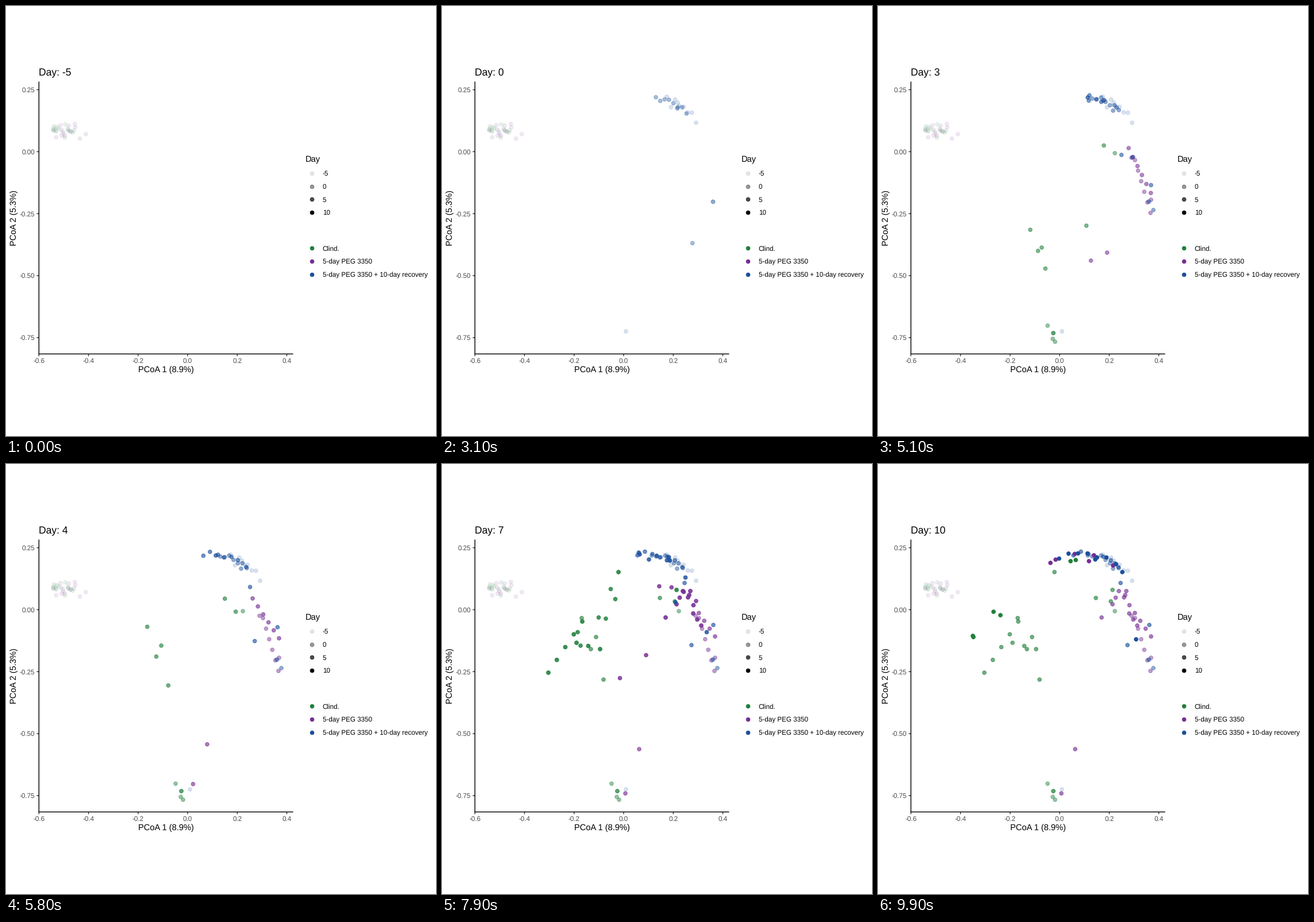
Write a matplotlib script that moves like this. It is 748x748 px and loops after 10000 ms.

```python
import matplotlib.pyplot as plt
import numpy as np
from matplotlib.animation import FuncAnimation
from matplotlib.colors import to_rgb

plt.rcParams.update({"font.family": "Liberation Sans", "text.hinting": "none",
                     "path.snap": False})

SIZE, DPI, FRAMES = 748, 96, 100
PT = 72 / DPI
GREEN, PURPLE, BLUE = "#1f7f3a", "#772d93", "#1a4f9c"

# Frames at which measured days -5, -4, 1, 4 and 10 are reached
STOPS = [0, 7, 40, 59, 99]
rng = np.random.default_rng(7)
tracks = []  # (colour, index of first stop, positions)


def add(color, first, *paths):
    tracks.extend((to_rgb(color), first, np.array(p, float)) for p in paths)


def weave(*rows):
    """Turn one row of positions per stop into one path per mouse."""
    return [[row[i] for row in rows if i < len(row)] for i in range(len(rows[0]))]


def row(p, q, n):
    """Evenly spaced points from p to q."""
    return np.linspace(p, q, n)


def arc(x0, x1, n, wobble):
    """Points along the upper arc of the ordination, loosely scattered."""
    x = np.linspace(x0, x1, n)
    y = 155 + 0.0055 * (x - 352) ** 2 + rng.uniform(-wobble, wobble, n)
    return np.column_stack([x, y])


def cloud_of(center, radii, n):
    r, a = np.sqrt(rng.random(n)), rng.uniform(0, 2 * np.pi, n)
    return center + np.column_stack([r * np.cos(a), r * np.sin(a)]) * radii


# Baseline cluster
add(GREEN, 0, *weave(cloud_of((98, 217), (21, 13), 15)))
add(PURPLE, 0, *weave(cloud_of((110, 217), (34, 18), 14)))

# Clind. mice rise from the bottom and part to both sides
add(GREEN, 2,
    [(412, 256), (379, 233), (166, 301)],
    [(295, 556), (243, 268), (344, 167)],
    [(308, 584), (268, 301), (335, 169)],
    [(305, 569), (281, 375), (201, 257)],
    [(305, 569), (259, 322), (213, 263)],
    [(304, 579), (405, 239), (165, 299)])
add(GREEN, 3, [(307, 188)], [(408, 219)],
    *weave(row((185, 363), (244, 274), 5)), *weave(row((234, 311), (275, 322), 3)))

# PEG mice: two dip to the bottom, the rest climb to the arc
add(PURPLE, 2,
    [(441, 264), (319, 573), (300, 172)],
    [(475, 337), (343, 496), (367, 169)],
    *weave(row((474, 360), (447, 268), 6), row((475, 300), (428, 232), 6),
           arc(409, 309, 4, 4)))
add(PURPLE, 3, [(389, 267)], *weave(row((408, 244), (419, 221), 3)),
    *weave(row((430, 228), (432, 221), 2)), *weave(row((437, 260), (451, 281), 3)))

# Recovery mice: three wander, the rest slide along the arc
add(BLUE, 1,
    [(410, 168), (409, 182), (434, 315), (378, 166)],
    [(472, 341), (471, 340), (422, 207), (425, 188)],
    [(320, 566), (479, 355), (472, 280), (449, 305)],
    *weave(arc(442, 391, 8, 10), arc(419, 365, 8, 4),
           rng.permutation(arc(418, 340, 7, 4)),
           rng.permutation(arc(414, 315, 7, 4))))


def alpha_at(frame):
    return 0.1 + 0.9 * frame / STOPS[-1]


def current(first, path, frame):
    """Position and opacity of a mouse now, or None if it is not shown."""
    times = (STOPS + [FRAMES])[first:first + len(path) + 1]
    if not times[0] <= frame < times[-1]:
        return None
    i = np.searchsorted(times, frame, side="right") - 1
    if i == len(path) - 1:
        return path[i], alpha_at(times[i])
    u = (frame - times[i]) / (times[i + 1] - times[i])
    return path[i] + (path[i + 1] - path[i]) * u, alpha_at(frame)


fig = plt.figure(figsize=(SIZE / DPI, SIZE / DPI), dpi=DPI, facecolor="white")
ax = fig.add_axes([0, 0, 1, 1])
ax.set(xlim=(0, SIZE), ylim=(SIZE, 0))
ax.axis("off")


def label(x, y, s, size, color="black", **kw):
    return ax.text(x, y, s, fontsize=size, color=color, va="baseline", **kw)


def line(xs, ys, color="black"):
    ax.plot(xs, ys, color=color, lw=1.42 * PT, solid_capstyle="butt")


def dots(xy=(), colors="none"):
    xs, ys = zip(*xy) if xy else ((), ())
    return ax.scatter(xs, ys, s=(6.64 * PT) ** 2, facecolors=colors,
                      edgecolors=colors, linewidths=0.945 * PT, zorder=3)


# Axes
LEFT, BOTTOM, UNIT = 57.3, 605.3, 431.2
for k in range(6):
    x = LEFT + 0.2 * UNIT * k
    line([x, x], [BOTTOM, BOTTOM + 3.9], "#333333")
    label(x, 621, f"{-0.6 + 0.2 * k + 1e-9:.1f}", 8.75, "#4d4d4d", ha="center")
for k in range(5):
    y = 145.6 + 0.25 * UNIT * k
    line([LEFT - 3.9, LEFT], [y, y], "#333333")
    label(50.4, y + 4.2, f"{0.25 - 0.25 * k:.2f}", 8.75, "#4d4d4d", ha="right")
line([LEFT, LEFT], [131.5, BOTTOM + 0.7])
line([LEFT - 0.7, 499.5], [BOTTOM, BOTTOM])
label(278.4, 637, "PCoA 1 (8.9%)", 10.95, ha="center")
ax.text(17.7, 368.5, "PCoA 2 (5.3%)", fontsize=10.95, rotation=90,
        rotation_mode="anchor", ha="center", va="baseline")

# Legends
label(520.6, 271.3, "Day", 10.95)
for k, day in enumerate((-5, 0, 5, 10)):
    y = 290.8 + 22.75 * k
    dots([(532.4, y)], [(0, 0, 0, 0.1 + 0.06 * (day + 5))])
    label(550.8, y + 4.2, str(day), 8.75)
for k, (color, name) in enumerate([
        (GREEN, "Clind."), (PURPLE, "5-day PEG 3350"),
        (BLUE, "5-day PEG 3350 + 10-day recovery")]):
    y = 421.4 + 22.75 * k
    dots([(532.4, y)], [color])
    label(550.8, y + 4.2, name, 8.75)

title = label(56.8, 121.3, "", 13.15)
mice = dots()


def update(frame):
    title.set_text(f"Day: {round(-5 + 15 * frame / STOPS[-1])}")
    marks, live = [], []
    for color, first, path in tracks:
        for stop, p in zip(STOPS[first:], path):
            if stop < frame:
                marks.append((p, color + (alpha_at(stop),)))
        now = current(first, path, frame)
        if now:
            live.append((now[0], color + (now[1],)))
    xy, colors = zip(*(marks + live))
    mice.set_offsets(xy)
    mice.set_facecolors(colors)
    mice.set_edgecolors(colors)
    return title, mice


anim = FuncAnimation(fig, update, frames=FRAMES, interval=100,
                     repeat=True, repeat_delay=0)
plt.show()
```
